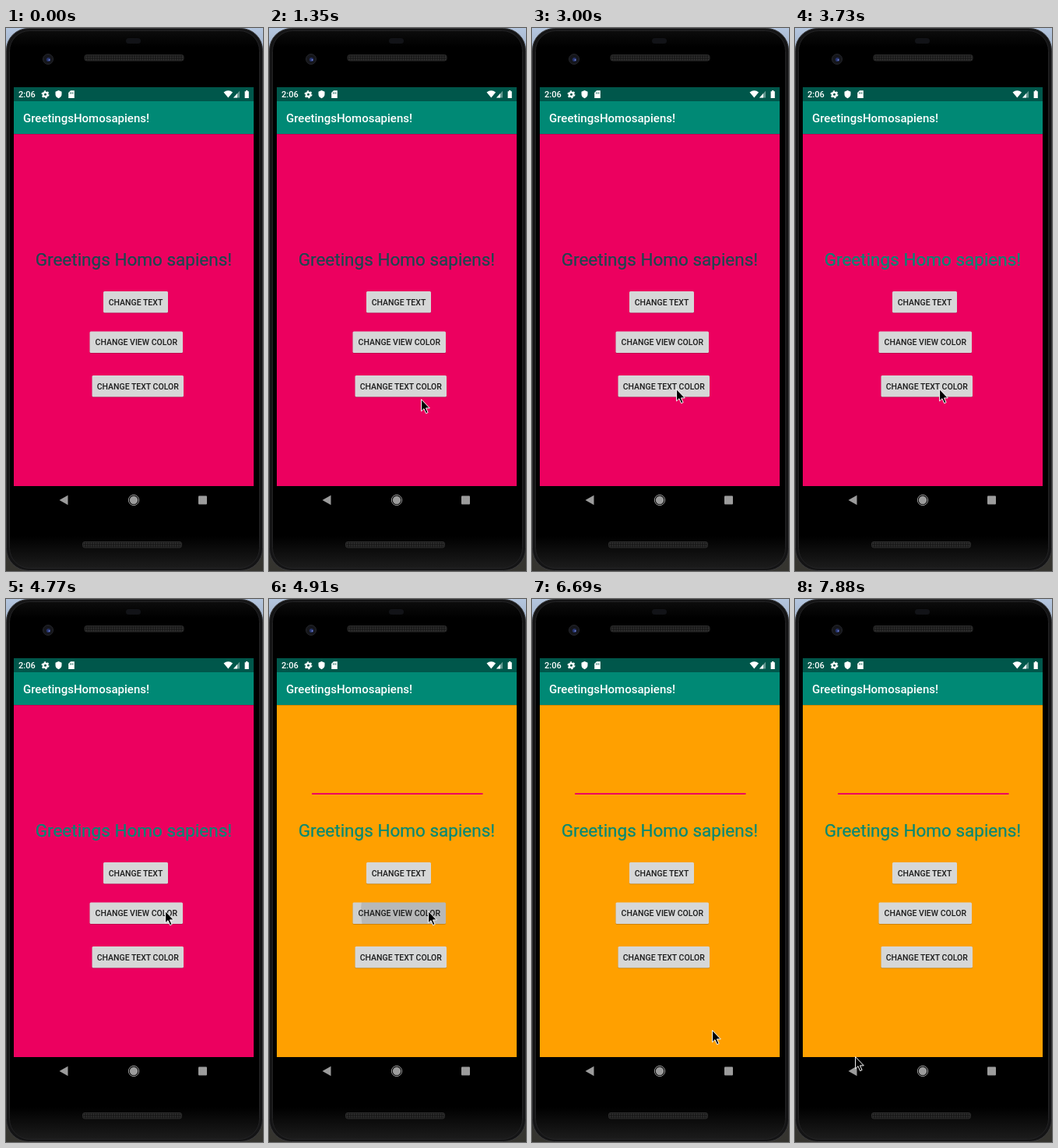
These frames come from a looping animation (330x697 px, 8 s). An HTML page:

```html
<!DOCTYPE html>
<html lang="en">
<head>
<meta charset="utf-8">
<style>
html, body { margin: 0; width: 100%; height: 100%; overflow: hidden; background: #000; }
svg { display: block; width: 330px; height: 697px; font-family: Roboto, sans-serif; }
.label { font-size: 10.5px; font-weight: 500; fill: #1b1b1b; text-anchor: middle; }
</style>
</head>
<body>
<svg viewBox="0 0 330 697">
  <defs>
    <linearGradient id="backdrop" x2="0" y2="1">
      <stop offset="0" stop-color="#b4c6df"/><stop offset=".3" stop-color="#3c4048"/><stop offset="1" stop-color="#35342f"/>
    </linearGradient>
    <linearGradient id="body" x2="0" y2="1">
      <stop offset="0" stop-color="#0c0c0c"/><stop offset=".03"/>
      <stop offset=".94"/><stop offset="1" stop-color="#1c1c1c"/>
    </linearGradient>
    <pattern id="mesh" width="3" height="3" patternUnits="userSpaceOnUse">
      <rect width="3" height="3" fill="#181818"/><circle cx="1.5" cy="1.5" r=".9" fill="#343434"/>
    </pattern>
    <clipPath id="hit"><rect id="hitBox" rx="1.5"/></clipPath>
  </defs>

  <rect width="330" height="697" fill="url(#backdrop)"/>
  <rect x=".5" y=".5" width="329" height="696" rx="28" fill="#141415" stroke="#39393b"/>
  <rect x="4.5" y="3.5" width="321" height="690" rx="26" fill="url(#body)" stroke="#232325"/>
  <rect x="154" y="13" width="19" height="7" rx="3.5" fill="#121317"/>
  <circle cx="54" cy="40" r="6.5" fill="#15161b" stroke="#25262b"/>
  <circle cx="54.5" cy="40.5" r="2.6" fill="#27346e"/>
  <circle cx="55.5" cy="41" r="1" fill="#7584d0"/>
  <g fill="url(#mesh)" stroke="#2c2c2c">
    <rect x="101" y="34.5" width="127" height="7.5" rx="2.5"/>
    <rect x="98.5" y="659.5" width="127" height="7.5" rx="2.5"/>
  </g>

  <rect id="view" x="10" y="136" width="308" height="452"/>
  <rect x="10" y="136" width="308" height="1" opacity=".15"/>
  <rect x="10" y="76" width="308" height="18" fill="#00574b"/>
  <rect x="10" y="94" width="308" height="42" fill="#008975"/>
  <g fill="#fff">
    <text x="16" y="89" font-size="11" font-weight="500">2:06</text>
    <circle cx="50.5" cy="85.3" r="2.7" fill="none" stroke="#fff" stroke-width="2.3"/>
    <circle cx="50.5" cy="85.3" r="4.3" fill="none" stroke="#fff" stroke-width="1.4" stroke-dasharray="2.25"/>
    <path d="M67.5 80l4 1.7v3.2q0 3.6-4 5.3-4-1.7-4-5.3v-3.2z"/>
    <path d="M83 80.3h4.8v9.6h-7.6v-6.8z"/>
    <path d="M82.5 82.5v2m1.7-2v2m1.7-2v2" stroke="#00574b" stroke-width=".8"/>
    <path d="M279.5 82.6q5.8-4.6 11.6 0l-5.8 7z"/>
    <path d="M292 89.5l8-8.7v8.7z" opacity=".4"/>
    <path d="M292 89.5l5-5.4v5.4z"/>
    <path d="M306.6 81.2h1.5v-1.1h2.2v1.1h1.5v8.7h-5.2z"/>
    <text x="22" y="121" font-size="15" font-weight="500">GreetingsHomosapiens!</text>
  </g>
  <rect x="55" y="249" width="219.5" height="2" fill="#ec005f"/>
  <rect id="caret" x="55" y="209" width="1.5" height="32" fill="#ec005f"/>
  <text id="greeting" x="37.7" y="305" font-size="22.5" stroke-width=".25">Greetings Homo sapiens!</text>

  <g id="buttons"></g>
  <g id="ripple" clip-path="url(#hit)">
    <rect x="100" y="330" width="140" height="150" opacity=".04"/>
    <circle id="wave" opacity=".11"/>
  </g>
  <g id="labels"></g>

  <g fill="#9c9c9c">
    <path d="M68.5 606l11-6.3v12.6z"/>
    <circle cx="164" cy="606" r="5.2"/>
    <circle cx="164" cy="606" r="6.7" fill="none" stroke="#9c9c9c"/>
    <rect x="247" y="600.5" width="11" height="11" rx="1"/>
  </g>
  <path id="pointer" d="M.6.7v15.2l3.4-3.2 2.6 6 2.5-1.1-2.6-5.7h4.8z" stroke="#fff"/>
</svg>
<script>
const LOOP = 8000, TICK = 148.4; // the screen refreshes once per tick
const HEIGHT = 27.5;
const TEXT_CLICK = 22, VIEW_CLICK = 33; // in ticks
const el = id => document.getElementById(id);
const set = (node, attrs) => Object.entries(attrs).forEach(([k, v]) => node.setAttribute(k, v));
const show = (node, on) => set(node, { visibility: on ? "visible" : "hidden" });

const buttons = [
  { label: "CHANGE TEXT", x: 125, y: 338, width: 83 },
  { label: "CHANGE VIEW COLOR", x: 107.5, y: 389.5, width: 119.5 },
  { label: "CHANGE TEXT COLOR", x: 110.5, y: 446, width: 117.5 },
];
for (const { label, x, y, width } of buttons) {
  const box = `x="${x}" width="${width}" height="${HEIGHT}" rx="1.5"`;
  el("buttons").innerHTML += `<rect ${box} y="${y + .8}" opacity=".25"/><rect ${box} y="${y}" fill="#d6d7d7"/>`;
  el("labels").innerHTML += `<text class="label" x="${x + width / 2}" y="${y + 17.8}">${label}</text>`;
}

// Pointer stops: tick, x, y
const stops = [
  [4, 291, 517], [6, 291, 517], [9, 195, 476], [11, 192, 464], [20, 185, 463], [28, 185, 463],
  [32, 204, 400], [37, 204, 400], [41, 317, 485], [45, 231, 553], [49, 95, 611], [51, 73, 602], [53, 77, 587],
];
function pointerAt(tick) {
  const next = stops.findIndex(s => s[0] > tick);
  if (next < 0) return stops.at(-1).slice(1);
  const [t0, x0, y0] = stops[next - 1], [t1, x1, y1] = stops[next];
  const p = (tick - t0) / (t1 - t0), eased = p * p * (3 - 2 * p);
  return [x0 + (x1 - x0) * eased, y0 + (y1 - y0) * eased].map(Math.round);
}

function draw(time) {
  const tick = Math.floor(time / TICK);
  const visible = tick >= stops[0][0];
  show(el("pointer"), visible);
  if (visible) set(el("pointer"), { transform: `translate(${pointerAt(tick)})` });

  const viewChanged = tick >= VIEW_CLICK;
  const ink = tick >= TEXT_CLICK ? "#008975" : "#1a4850";
  set(el("view"), { fill: viewChanged ? "#ffa000" : "#ec005f" });
  set(el("greeting"), { fill: ink, stroke: ink });
  const blink = tick * TICK % 1000;
  show(el("caret"), viewChanged && blink >= 60 && blink < 560);

  const age = tick - (viewChanged ? VIEW_CLICK : TEXT_CLICK);
  const rippling = age >= 0 && age < 2;
  show(el("ripple"), rippling);
  if (rippling) {
    const { x, y, width } = buttons[viewChanged ? 1 : 2];
    const [cx, cy] = pointerAt(tick);
    set(el("hitBox"), { x, y, width, height: HEIGHT });
    set(el("wave"), { cx: cx + 1, cy: cy + 1, r: 87 + 75 * age });
    set(el("ripple"), { opacity: 1 - age / 2 });
  }
}

const start = performance.now();
(function frame() {
  draw((performance.now() - start) % LOOP);
  requestAnimationFrame(frame);
})();
</script>
</body>
</html>
```
